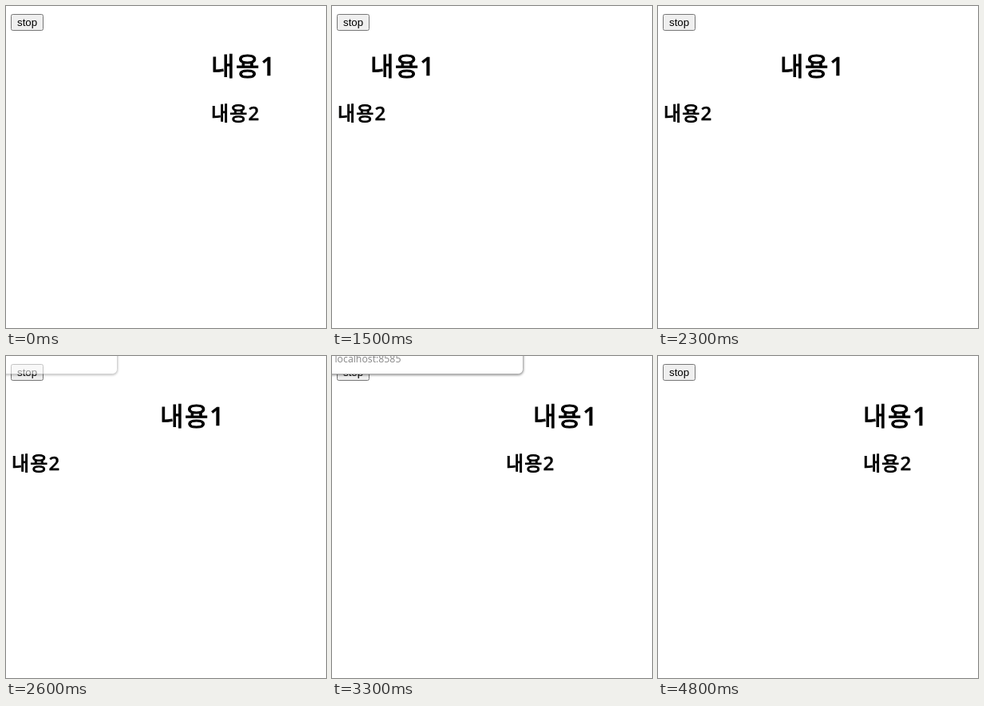
These frames come from a looping animation (401 px wide and 403 px high, 5.3 s). An HTML page:

```html
<!DOCTYPE html>
<html lang="ko">
<head>
<meta charset="utf-8">
<title>stop</title>
<style>
  html, body { margin: 0; width: 100%; height: 100%; overflow: hidden; background: #fff; }
  svg { display: block; width: 401px; height: 403px; }
  .head { font-family: "Open Sans", "Noto Sans CJK KR", "Noto Sans CJK", sans-serif; letter-spacing: .05em; stroke: #000; }
  .head tspan { font-weight: 600; stroke-width: .3px; }
  #h1 { font-size: 32px; }
  #h2 { font-size: 24px; }
  #label { font: 13.333px "Liberation Sans", Arial, sans-serif; }
  #host { font: 12.3px "Open Sans", sans-serif; fill: #858585; }
  #card rect { filter: drop-shadow(0 1px 1.5px rgba(0, 0, 0, .45)); }
</style>
</head>
<body>
<svg viewBox="0 0 401 403">
  <rect id="button" x="6.5" y="10.5" width="40" height="20" rx="2"/>
  <text id="label" x="14" y="25">stop</text>
  <text id="h1" class="head" y="87">내용<tspan>1</tspan></text>
  <text id="h2" class="head" y="143">내용<tspan>2</tspan></text>
  <g id="card">
    <rect x="0.5" y="-60" width="254" height="82.5" rx="6" fill="#fff" stroke="#b4b4b4"/>
    <text id="host" x="18.5" y="8">localhost:8585</text>
  </g>
  <path id="cursor" d="M.5 .8V16.4L4.1 13 6.6 18.6 9 17.5 6.6 12.1H11.6Z" fill="#fff" stroke="#111"/>
</svg>
<script>
const LOOP = 5300, STEP = 100, LEFT = 7, TRAVEL = 250;
const $ = id => document.getElementById(id);
const [button, h1, h2, card, cursor] = ['button', 'h1', 'h2', 'card', 'cursor'].map($);

const progress = (t, from, to) => Math.min(1, Math.max(0, (t - from) / (to - from)));
const swing = p => 0.5 - Math.cos(p * Math.PI) / 2;
const mix = (a, b, p) => a + (b - a) * p;

function place(el, x, y, visible = true) {
  el.setAttribute('transform', `translate(${x} ${y})`);
  el.style.display = visible ? '' : 'none';
}

function slide(el, t, from, to) {
  const p = t < 800 ? 1 : swing(progress(t, from, to));
  el.setAttribute('x', LEFT + Math.round(TRAVEL * p));
}

function drawCard(t) {
  const shown = t < 3150 ? progress(t, 2500, 2850) : 1 - progress(t, 3150, 3500);
  place(card, Math.round(mix(-160, 78, swing(shown))), 0, shown > 0);
  card.style.opacity = Math.min(1, shown * 2);
}

function drawCursor(t) {
  const p = swing(progress(t, 3800, 4200));
  let x = mix(4, 27, p), y = mix(33, 22, p);
  if (t >= 4700) [x, y] = [387, 17];
  else if (t >= 4600) [x, y] = [119, 28];
  place(cursor, Math.round(x), Math.round(y), t >= 3800 && t < 4800);
}

function drawButton(t) {
  let colors = ['#efefef', '#767676'];
  if (t >= 4300 && t < 4400) colors = ['#f5f5f5', '#8d8d8d'];
  else if (t >= 4000 && t < 4600) colors = ['#e5e5e5', '#4f4f4f'];
  button.setAttribute('fill', colors[0]);
  button.setAttribute('stroke', colors[1]);
}

function draw(now) {
  const t = Math.floor((now % LOOP) / STEP) * STEP;
  slide(h1, t, 760, 3540);
  slide(h2, t, 2610, 3540);
  drawCard(t);
  drawCursor(t);
  drawButton(t);
}

const start = performance.now();
function tick() {
  draw(performance.now() - start);
  requestAnimationFrame(tick);
}
tick();
</script>
</body>
</html>
```
